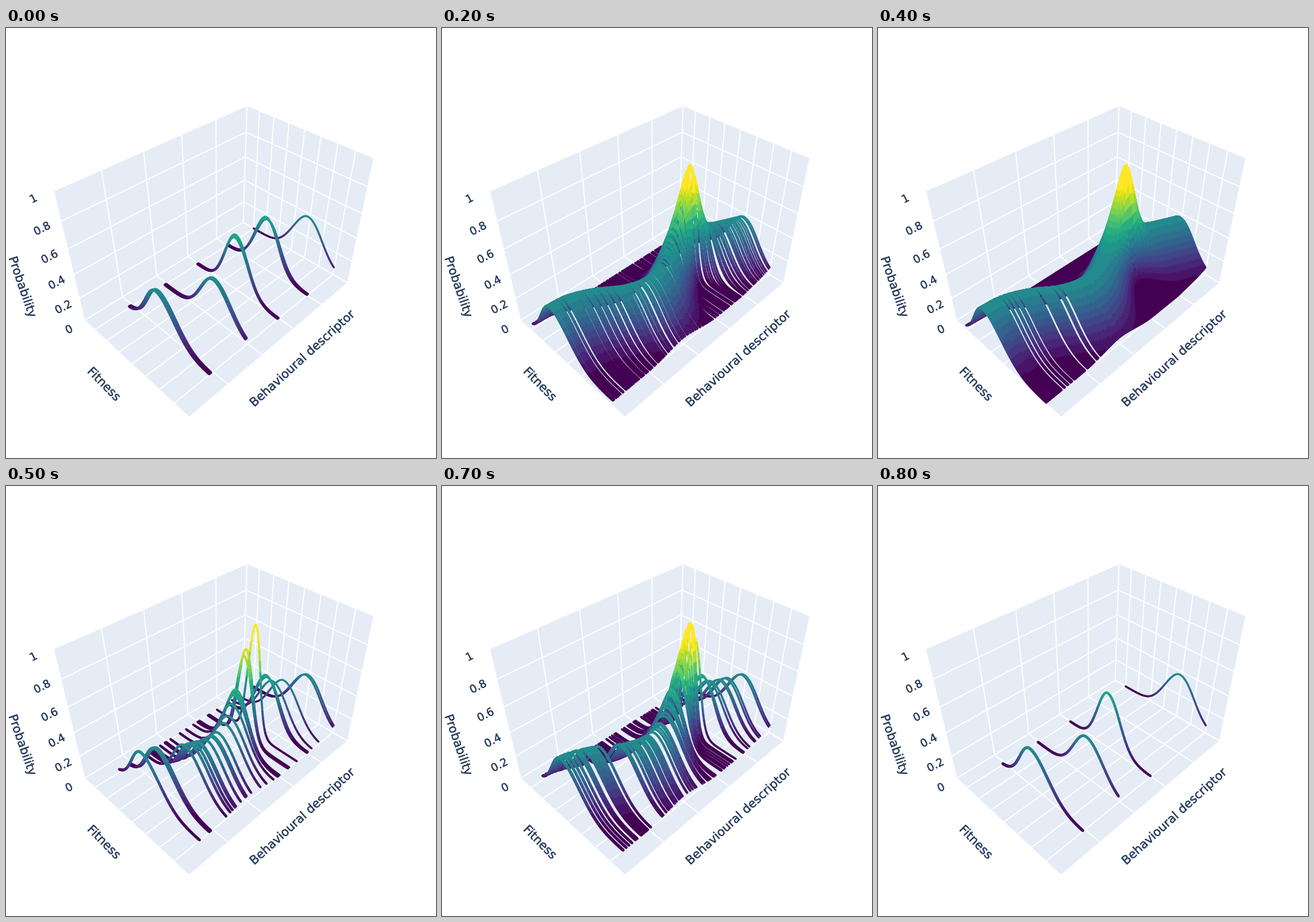
Write a matplotlib script that moves like this. It is 748 px wide and 748 px high and loops after 0.9 s.

```python
import numpy as np
import matplotlib.pyplot as plt
from matplotlib import patheffects
from matplotlib.animation import FuncAnimation
from matplotlib.collections import LineCollection
from matplotlib.patches import Polygon

SIZE = 748
DPI = 100
PX = 72 / DPI
INK = "#2a3f5f"
WALL = "#e5ecf6"

# Rows give x, y and depth for (descriptor u, fitness v, probability z, 1).
CAMERA = np.array([
    [375.45, 129.96, -69.45, 137.0],
    [-87.6, 59.5, -277.7, 508.0],
    [0.2438, -0.1605, -0.1862, 1.0],
])

MODES = [0.325, 0.345, 0.435, 0.575, 0.633, 0.58,
         0.479, 0.445, 0.475, 0.56, 0.645]
SAMPLES = 81
COLOR_TOP = 0.78
LEVELS = 20


def project(u, v, z):
    u, v, z = np.broadcast_arrays(u, v, z)
    points = np.stack([u, v, z, np.ones_like(u, dtype=float)], axis=-1)
    x, y, w = np.moveaxis(points @ CAMERA.T, -1, 0)
    return np.stack([x / w + 0.5, y / w], axis=-1)


def mode(u):
    """Catmull-Rom curve through the evenly spaced mode positions."""
    p = np.array([2 * MODES[0] - MODES[1], *MODES, 2 * MODES[-1] - MODES[-2]])
    t = np.asarray(u) * (len(MODES) - 1)
    i = np.clip(t.astype(int), 0, len(MODES) - 2)
    t = t - i
    a, b, c, d = p[i], p[i + 1], p[i + 2], p[i + 3]
    return b + t / 2 * (c - a + t * (2 * a - 5 * b + 4 * c - d
                                     + t * (3 * (b - c) + d - a)))


def height(u):
    d = np.asarray(u) - 0.715
    left = np.exp(-(np.abs(d) / 0.0815) ** 1.5)
    right = np.exp(-(d / 0.063) ** 2)
    return 0.37 + 0.53 * np.where(d < 0, left, right)


def density(u, s):
    """Skewed bell whose width shrinks as its height grows."""
    h = height(u)
    d = s - mode(u)
    width = np.where(d < 0, 0.152, 0.19) * 0.37 / h
    return h * np.exp(-(d / width) ** 2 / 2)


def make_curves(us, base_width, banded):
    u = np.sort(us)[::-1][:, None]
    s = np.linspace(0, 1, SAMPLES)[None, :]
    z = density(u, s)
    xy = project(u, 0.113 + 0.763 * s, z)
    segments = np.stack([xy[:, :-1], xy[:, 1:]], axis=2).reshape(-1, 2, 2)
    level = np.clip((z[:, :-1] + z[:, 1:]) / 2 / COLOR_TOP, 0, 1).ravel()
    if banded:
        level = np.minimum(np.floor(level * LEVELS), LEVELS - 1) / (LEVELS - 1)
    widths = base_width * np.repeat(1 - 0.4 * u[:, 0], SAMPLES - 1) * PX
    return segments, plt.cm.viridis(level), widths


rng = np.random.default_rng(7)
count = 115
pool = 0.014 + 0.986 * (np.arange(count) + rng.random(count)) / count
shuffled = rng.permutation(pool)
full = np.linspace(0, 1, 900)
gaps = np.array([0.085, 0.102, 0.119, 0.139, 0.21, 0.262, 0.283])
nearly_full = full[np.abs(full[:, None] - gaps).min(axis=1) > 0.0055]

two = [0.394, 1.0]
four = two + [0.19, 0.6]
doubled = four + [0.182, 0.387, 0.594, 0.801, 0.808]

few = make_curves(doubled, 5.6, False)
STATES = [
    few,
    few,
    make_curves(np.append(pool, [0.014, 1]), 4.8, True),
    make_curves(two, 5.6, False),
    make_curves(nearly_full, 3.7, True),
    make_curves(np.append(shuffled[:20], doubled), 5.2, True),
    make_curves(full, 3.2, True),
    make_curves(np.append(shuffled[:55], doubled), 5.2, True),
    make_curves(four, 5.6, False),
]
COARSE_STATE = 3

fig = plt.figure(figsize=(SIZE / DPI, SIZE / DPI), dpi=DPI, facecolor="white")
ax = fig.add_axes([0, 0, 1, 1])
ax.set_xlim(0, SIZE)
ax.set_ylim(SIZE, 0)
ax.axis("off")


def grid_line(*corners):
    u, v, z = np.array(corners, dtype=float).T
    x, y = project(u, v, z).T
    return ax.plot(x, y, color="white", lw=2 * PX, zorder=2)[0]


def label(x, y, text, angle, size):
    stroke = patheffects.withStroke(linewidth=0.4 * PX, foreground=INK)
    return ax.text(x, y, text, rotation=angle, fontsize=size * PX, color=INK,
                   family="DejaVu Sans", ha="center", va="center", zorder=4,
                   path_effects=[stroke])


def height_tick(z, x, y):
    return [grid_line((0, 0, z), (1, 0, z), (1, 1, z)),
            label(x, y, f"{z:g}", 27, 19)]


outline = np.array([(0, 0, 0), (0, 1, 0), (1, 1, 0),
                    (1, 1, 1), (1, 0, 1), (0, 0, 1)], dtype=float)
ax.add_patch(Polygon(project(*outline.T), fc=WALL, ec="none", zorder=1))

for u in np.arange(1, 6) / 5:
    grid_line((u, 0, 1), (u, 0, 0), (u, 1, 0))
for v in 0.114 + 0.1275 * np.arange(7):
    grid_line((1, v, 1), (1, v, 0), (0, v, 0))

height_tick(0, 110, 525)
height_tick(1, 48, 297.5)
fine_ticks = sum([height_tick(0.2, 100, 486), height_tick(0.4, 88.5, 443.5),
                  height_tick(0.6, 76, 398.5), height_tick(0.8, 63, 349.5)],
                 [])
coarse_ticks = height_tick(0.5, 82, 424)

label(28, 450.5, "Probability", -71, 21)
label(170, 620, "Fitness", -45.5, 21)
label(515.5, 575.5, "Behavioural descriptor", 42.3, 21)

curves = LineCollection([], capstyle="round", zorder=3)
ax.add_collection(curves, autolim=False)


def update(index):
    segments, colors, widths = STATES[index]
    curves.set_segments(segments)
    curves.set_color(colors)
    curves.set_linewidth(widths)
    coarse = index == COARSE_STATE
    for artist in fine_ticks:
        artist.set_visible(not coarse)
    for artist in coarse_ticks:
        artist.set_visible(coarse)
    return [curves, *fine_ticks, *coarse_ticks]


anim = FuncAnimation(fig, update, frames=len(STATES), interval=100,
                     repeat=True, repeat_delay=0, blit=False)
plt.show()
```
